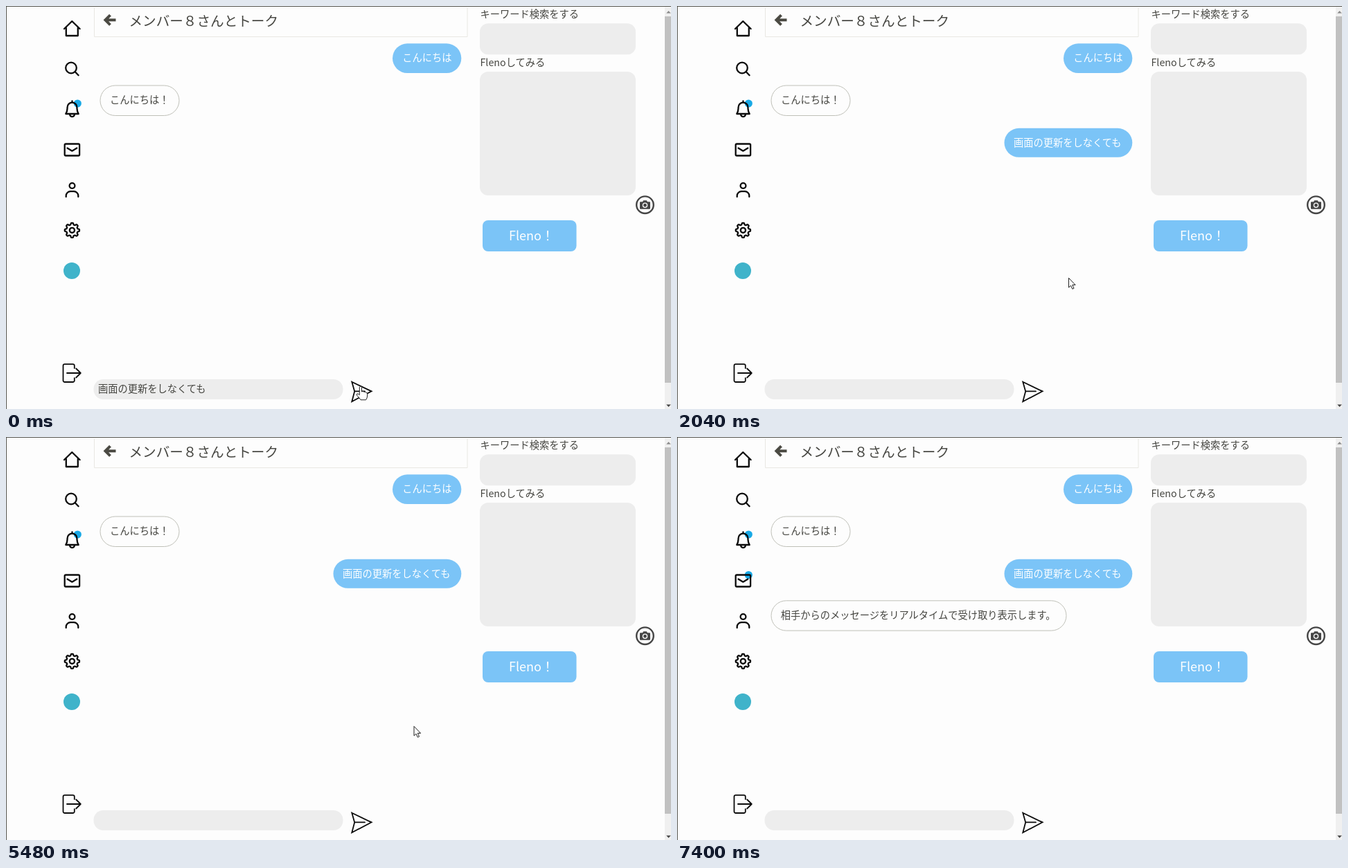
An HTML page that plays this animation: 960 px wide and 583 px high, repeating every 8120 ms.

```html
<!DOCTYPE html>
<html lang="ja">
<head>
<meta charset="utf-8">
<title>トーク</title>
<style>
  html, body { margin: 0; width: 100%; height: 100%; overflow: hidden; background: #fdfdfd; }
  svg { display: block; width: 100vw; height: 100vh; }
  text { font-family: "Noto Sans CJK JP", "Noto Sans CJK", sans-serif; font-size: 14.25px; fill: #454540; }
  .light { fill: #fff; }
  .line { fill: none; stroke: #0b0b0b; stroke-width: 2.3; stroke-linecap: round; stroke-linejoin: round; }
  .thin { stroke-width: 1.8; }
  .sent { fill: #7bc4f7; }
  .got { fill: #fdfdfd; stroke: #bfc0b8; }
  .field { fill: #ededed; }
  .badge { fill: #18a9e6; }
  .pointer { fill: #fff; stroke: #222; stroke-width: 1; stroke-linejoin: round; }
</style>
</head>
<body>
<svg viewBox="0 0 960 583" preserveAspectRatio="none">
  <rect width="960" height="583" fill="#fdfdfd"/>

  <!-- talk header -->
  <path d="M127.5 2V44.5H666V2" fill="none" stroke="#e9e8e3"/>
  <path d="M150.5 13.2L143.4 20.3L150.5 27.4M144 20.3H158.5" fill="none" stroke="#4b4a43" stroke-width="4"/>
  <text x="177.5" y="28.6" style="font-size:19.6px;font-weight:500">メンバー８さんとトーク</text>

  <!-- side menu -->
  <path class="line" d="M84 33L95.3 22L106.6 33M86.8 31.5V43H103.8V31.5"/>
  <circle class="line" cx="94" cy="89.5" r="7.8"/>
  <path class="line" d="M99.8 95.3L104.6 100.2"/>
  <circle class="badge" cx="103.3" cy="141" r="5.6"/>
  <path class="line" d="M86.3 156C88.8 153 88.3 150 88.6 146.5A6.9 6.9 0 0 1 102.4 146.5C102.7 150 102.2 153 104.7 156ZM95.5 137.5V139.3M92.2 157.5A3.4 3.4 0 0 0 98.8 157.5"/>
  <circle class="badge" id="mailBadge" cx="103.3" cy="199.5" r="5.6"/>
  <rect class="line" x="84.7" y="199.5" width="21.4" height="17" rx="1.6"/>
  <path class="line" d="M88.5 205.5L95.4 209.7L102.3 205.5"/>
  <circle class="line" cx="95.5" cy="260" r="3.9"/>
  <path class="line" d="M86.7 276V274.5A6.4 6.4 0 0 1 93.1 268.2H97.9A6.4 6.4 0 0 1 104.3 274.5V276"/>
  <path class="line" id="gear"/>
  <circle class="line" cx="95.4" cy="324.4" r="3.6"/>
  <circle cx="95" cy="383" r="12" fill="#3fb3ca"/>
  <path class="line thin" d="M98.8 524V520.5A2.3 2.3 0 0 0 96.5 518.2H84.8A2.3 2.3 0 0 0 82.5 520.5V541.7A2.3 2.3 0 0 0 84.8 544H96.5A2.3 2.3 0 0 0 98.8 541.7V538.2M88 531H107.8M101.2 524.5L107.8 531L101.2 537.5"/>

  <!-- messages -->
  <rect class="sent" x="558" y="54.3" width="99.3" height="42.7" rx="21.3"/>
  <text class="light" x="572.3" y="80.4">こんにちは</text>
  <rect class="got" x="136" y="115" width="114" height="43.5" rx="21.7"/>
  <text x="150" y="141">こんにちは！</text>
  <g id="sentMsg">
    <rect class="sent" x="472.5" y="176.8" width="184.8" height="42" rx="21"/>
    <text class="light" x="486" y="202.8">画面の更新をしなくても</text>
  </g>
  <g id="reply">
    <rect class="got" x="136" y="236.8" width="426" height="43.3" rx="21.6"/>
    <text x="149.7" y="263">相手からのメッセージをリアルタイムで受け取り表示します。</text>
  </g>

  <!-- message field -->
  <rect class="field" x="126.5" y="540" width="360" height="29" rx="14"/>
  <text id="draft" x="133" y="559.3">画面の更新をしなくても</text>
  <path class="line thin" style="stroke-linejoin:miter" d="M499.3 543.8L527.6 557.4L499.3 572.2L503.2 557.4ZM503.2 557.4H518"/>

  <!-- right column -->
  <text x="684.5" y="17.4">キーワード検索をする</text>
  <rect class="field" x="684" y="25.3" width="225" height="45" rx="12"/>
  <text x="684.5" y="87">Flenoしてみる</text>
  <rect class="field" x="684" y="95" width="225" height="179" rx="12"/>
  <circle cx="922.5" cy="287.7" r="12.3" fill="none" stroke="#454545" stroke-width="2.4"/>
  <path d="M916 283.3H919L920.2 281.3H924.8L926 283.3H929Q930 283.3 930 284.3V292.7Q930 293.7 929 293.7H916Q915 293.7 915 292.7V284.3Q915 283.3 916 283.3Z" fill="#454545"/>
  <circle cx="922.5" cy="288.3" r="3.1" fill="#454545" stroke="#fdfdfd" stroke-width="1.3"/>
  <rect class="sent" x="688" y="310" width="135.5" height="45" rx="8"/>
  <text class="light" x="726" y="338.5" style="font-size:18px">Fleno！</text>

  <!-- window edges -->
  <rect x="951" width="9" height="583" fill="#f0f0f0"/>
  <rect x="951" y="15" width="9" height="530" fill="#c1c1c1"/>
  <path d="M953.2 10.5L956.5 7L959.8 10.5Z" fill="#8a8a8a"/>
  <path d="M953.2 576.5L956.5 580L959.8 576.5Z" fill="#444"/>
  <path d="M0 .5H960M.5 0V583" fill="none" stroke="#55554f"/>

  <g id="ripple">
    <circle id="ring" cx="512" cy="551" fill="#5fd6d6" fill-opacity=".22" stroke="#58cfd0" stroke-width="1.8"/>
    <circle cx="512" cy="551" r="3" fill="#27bfc0"/>
  </g>
  <path class="pointer" id="hand" d="M-1.7 1.2Q0-1 1.5 1.2V8Q3.5 6.3 4.6 8.3Q6.5 7.3 7.4 9.2Q9.4 8.7 9.6 11V14Q9.6 17 7.6 19.8H0Q-2 16.5-5.6 13Q-6.5 10.6-4 10.9L-1.7 12.6Z"/>
  <path class="pointer" id="arrow" d="M.5 .5V14.2L3.6 11.4L5.8 16.4L8 15.4L5.8 10.5H10.1Z"/>
</svg>
<script>
const LOOP = 8120, STEP = 40;
const SEND_AT = 600, REPLY_AT = 6880, LEAVE_AT = 6120;
const RIPPLE = [520, 960];

// Pointer positions: time, x, y
const route = [
  [0, 512, 550], [560, 512, 550], [720, 532, 456], [840, 535, 441],
  [1200, 538, 430], [1280, 538, 430], [1480, 540, 422], [1720, 540, 422],
  [2040, 565, 393], [4360, 565, 393], [4400, 566, 393], [4640, 566, 393],
  [4680, 568, 393], [4800, 568, 393], [5480, 588.5, 418], [5640, 589, 452],
  [5720, 589, 452], [6120, 606, 584]
];

const el = id => document.getElementById(id);
const show = (id, on) => el(id).style.display = on ? '' : 'none';

function gearPath(cx, cy, teeth) {
  const points = [];
  for (let i = 0; i < 96; i++) {
    const a = i / 96 * 2 * Math.PI;
    const wave = Math.max(-0.7, Math.min(0.7, Math.cos(teeth * a) * 1.2));
    const r = 9.4 + 1.7 * wave;
    points.push((cx + r * Math.sin(a)).toFixed(2) + ' ' + (cy - r * Math.cos(a)).toFixed(2));
  }
  return 'M' + points.join('L') + 'Z';
}

function pointerAt(t) {
  const next = route.findIndex(p => p[0] > t);
  if (next < 0) return route[route.length - 1].slice(1);
  const [t0, x0, y0] = route[next - 1], [t1, x1, y1] = route[next];
  const k = (t - t0) / (t1 - t0);
  return [x0 + (x1 - x0) * k, y0 + (y1 - y0) * k];
}

function draw(time) {
  const t = Math.floor(time % LOOP / STEP) * STEP;
  const sent = t >= SEND_AT, replied = t >= REPLY_AT;
  show('draft', !sent);
  show('sentMsg', sent);
  show('reply', replied);
  show('mailBadge', replied);

  const [start, end] = RIPPLE;
  const k = (t - start) / (end - start);
  show('ripple', k >= 0 && k < 1);
  if (k >= 0 && k < 1) {
    el('ring').setAttribute('r', 4 + 15 * k);
    el('ripple').setAttribute('opacity', Math.min(1, 2 * (1 - k)));
  }

  const [x, y] = pointerAt(t);
  const place = `translate(${x.toFixed(1)} ${y.toFixed(1)})`;
  show('hand', t < SEND_AT);
  show('arrow', t >= SEND_AT && t < LEAVE_AT);
  el('hand').setAttribute('transform', place);
  el('arrow').setAttribute('transform', place);
}

el('gear').setAttribute('d', gearPath(95.4, 324.4, 8));
const began = performance.now();
function tick() {
  draw(performance.now() - began);
  requestAnimationFrame(tick);
}
tick();
</script>
</body>
</html>
```
